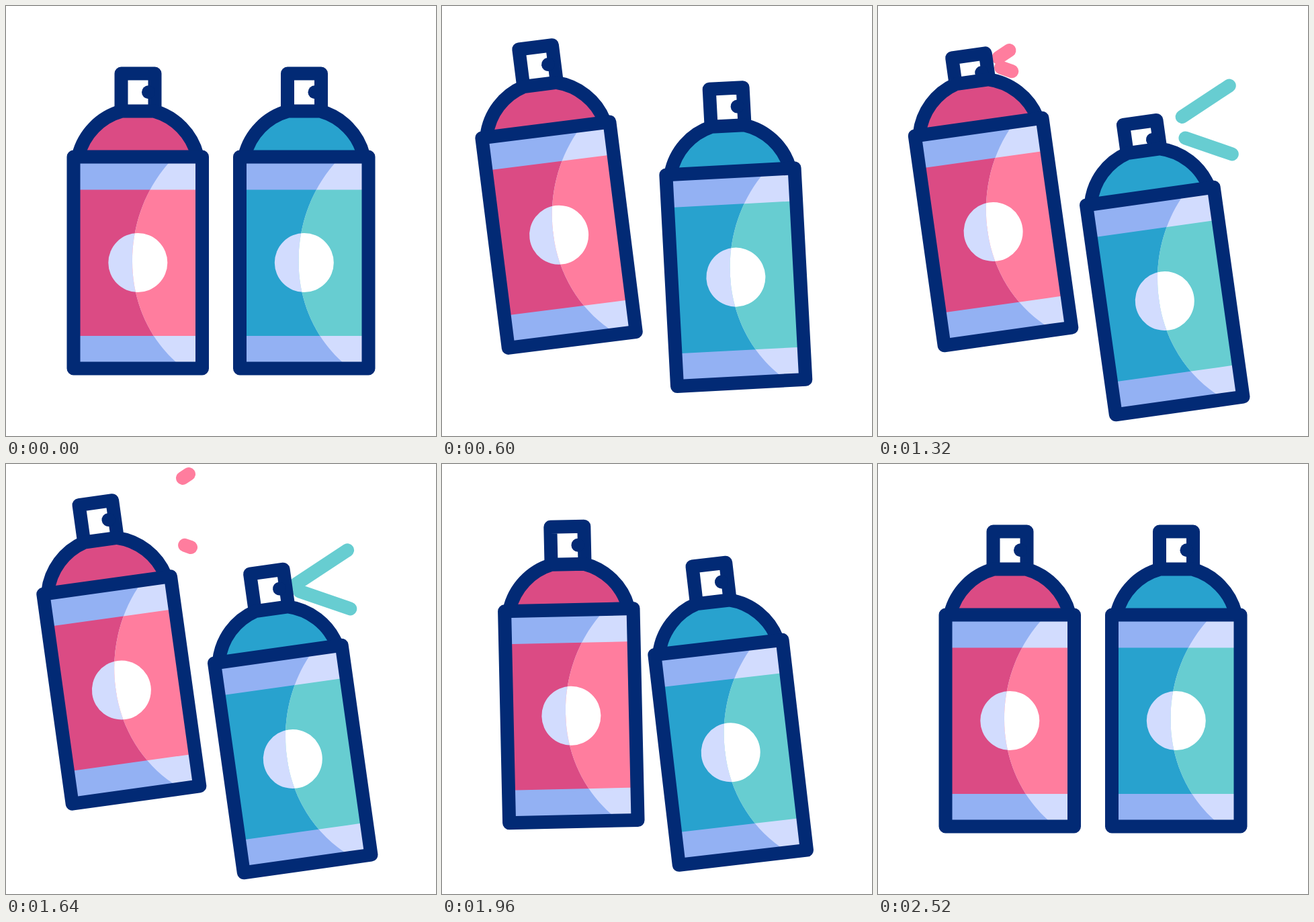
An HTML page that plays this animation: 640x640 px, repeating every 3 s.

```html
<!DOCTYPE html>
<html lang="en">
<head>
<meta charset="utf-8">
<title>Spray cans</title>
<style>
  html, body { margin: 0; height: 100%; overflow: hidden; background: #fff; }
  svg { display: block; width: 100%; height: 100%; }
</style>
</head>
<body>
<svg id="stage" viewBox="0 0 640 640"></svg>
<script>
const NAVY = '#022a75', LOOP = 3000;

const cans = [
  { x: 0, dx: -24.7, dy: -46, out: 200, back: 1600, press: 16.8,
    dark: '#db4b84', light: '#ff7d9e', pulses: [835, 1235],
    rays: [[179, 77, 272, 15], [183, 91.5, 275, 124]] },
  { x: 247.5, dx: -17, dy: 57, out: 400, back: 1820, press: 13.4,
    dark: '#28a2ce', light: '#67cdd1', pulses: [1035, 1435],
    rays: [[432, 178.5, 526, 116.5], [437, 189.5, 530, 221.5]] }
];

const label = (band, body, dot) => `
  <rect x="100" y="225" width="192" height="315" fill="${band}"/>
  <rect x="100" y="273.5" width="192" height="217.5" fill="${body}"/>
  <circle cx="196.3" cy="382" r="44" fill="${dot}"/>`;

const canMarkup = c => `
  <g class="spray" stroke="${c.light}" stroke-width="20" stroke-linecap="round"></g>
  <g class="can" stroke-linejoin="round">
    <g class="nozzle">
      <path d="M171.5 156.5V100.5H221.5V156.5" fill="#fff" stroke="${NAVY}" stroke-width="20"/>
      <circle cx="212" cy="128.3" r="10" fill="${NAVY}"/>
    </g>
    <path d="M107.9 222A91.5 91.5 0 0 1 172 156.5H220.6A91.5 91.5 0 0 1 284.6 222"
      fill="${c.dark}" stroke="${NAVY}" stroke-width="20"/>
    ${label('#93b1f3', c.dark, '#d2dcfe')}
    <g clip-path="url(#shine)">${label('#d2dcfe', c.light, '#fff')}</g>
    <rect x="100.5" y="224.5" width="191.5" height="315" fill="none" stroke="${NAVY}" stroke-width="20"/>
  </g>`;

const stage = document.getElementById('stage');
stage.innerHTML = `
  <clipPath id="shine">
    <path d="M262 540L253 530C213 494 188 440 188 380C188 324 208 273 241 235L250 224H300V540Z"/>
  </clipPath>` + cans.map(canMarkup).join('');

const find = name => [...stage.querySelectorAll('.' + name)];
const bodies = find('can'), nozzles = find('nozzle'), sprays = find('spray');

// cubic-bezier(.4, 0, .3, 1), solved by bisection
function ease(u) {
  if (u <= 0) return 0;
  if (u >= 1) return 1;
  let lo = 0, hi = 1;
  for (let i = 0; i < 24; i++) {
    const s = (lo + hi) / 2, r = 1 - s;
    if (1.2 * r * r * s + 0.9 * r * s * s + s ** 3 < u) lo = s; else hi = s;
  }
  return lo * lo * (3 - 2 * lo);
}

const ramp = (t, start, length) => ease((t - start) / length);

// The visible part of a ray runs from its tail to its head
function ray([x1, y1, x2, y2], tail, head) {
  const x = k => x1 + (x2 - x1) * k, y = k => y1 + (y2 - y1) * k;
  return `<line x1="${x(tail)}" y1="${y(tail)}" x2="${x(head)}" y2="${y(head)}"/>`;
}

function pulse(rays, age) {
  const head = ramp(age, 0, 360), tail = ramp(age, 210, 290);
  if (head < 0.01 || tail > 0.985) return '';
  return rays.map(r => ray(r, tail, head)).join('');
}

function draw(now) {
  const t = now % LOOP;
  const push = ramp(t, 760, 150) - ramp(t, 1360, 220);
  cans.forEach((c, i) => {
    const p = ramp(t, c.out, 600) - ramp(t, c.back, 600);
    bodies[i].setAttribute('transform',
      `translate(${c.x + c.dx * p} ${c.dy * p}) rotate(${-8 * p} 196.3 382)`);
    nozzles[i].setAttribute('transform', `translate(0 ${c.press * push})`);
    sprays[i].innerHTML = c.pulses.map(start => pulse(c.rays, t - start)).join('');
  });
  requestAnimationFrame(draw);
}
requestAnimationFrame(draw);
</script>
</body>
</html>
```
